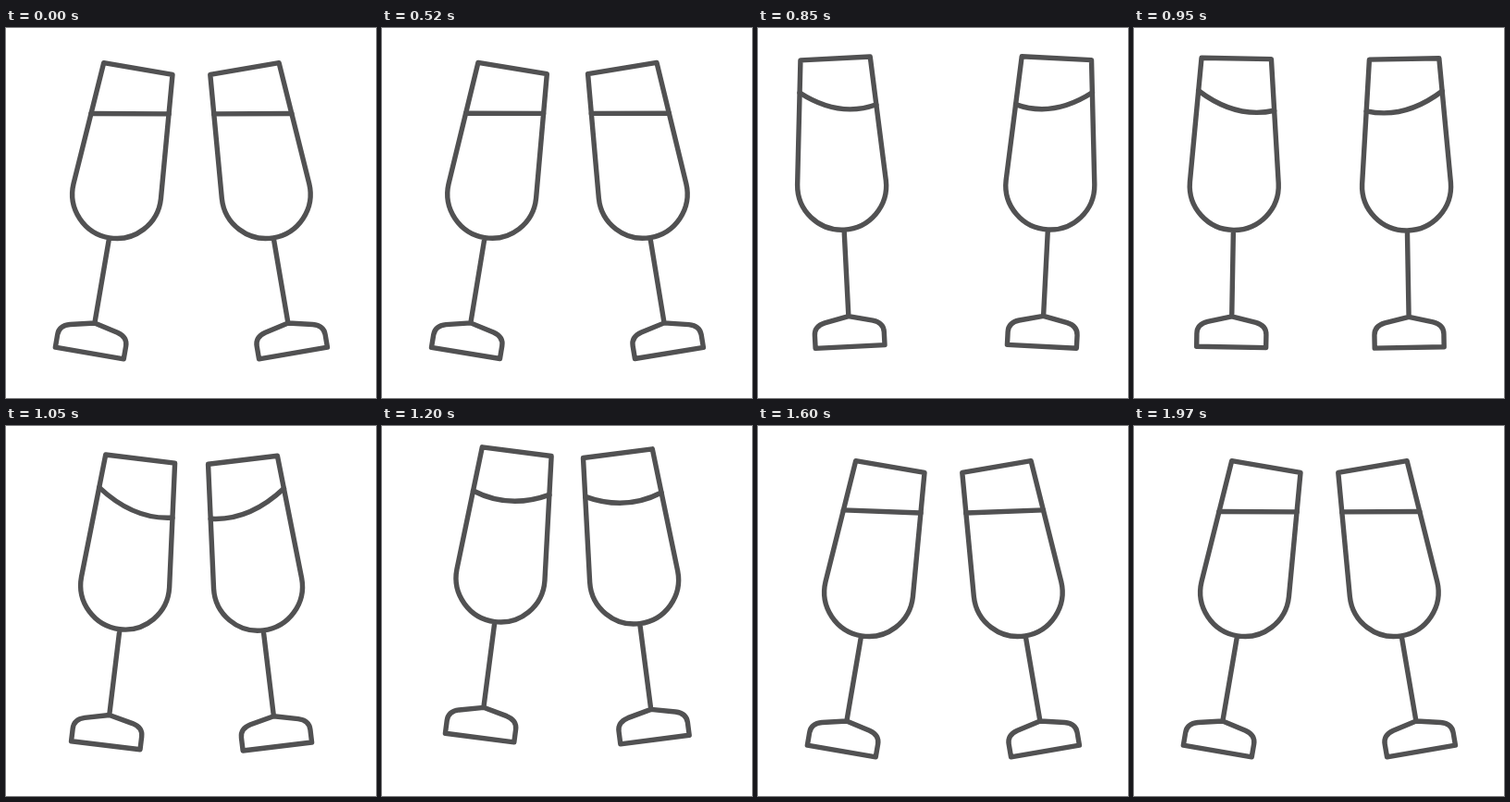
Recreate the animation shown at these times as an HTML page. Size 400x400 px, loop 2020 ms.

```html
<!DOCTYPE html>
<html lang="en">
<head>
<meta charset="utf-8">
<title>Toast</title>
<style>
  html, body { margin: 0; width: 100%; height: 100%; overflow: hidden; background: #fff; }
  svg { display: block; width: 100%; height: 100%; }
  path { fill: none; stroke: #515152; stroke-width: 5.4; stroke-linecap: round; stroke-linejoin: round; }
</style>
</head>
<body>
<svg viewBox="0 0 400 400">
  <defs>
    <path id="glass" d="M-37.7 0H37.7L47.9 134.4A48 48 0 1 1 -47.9 134.4Z M0 186V279
      M-37.5 312H37.5V298Q37.5 288 26 285L0 279L-26 285Q-37.5 288 -37.5 298Z"/>
  </defs>
  <g><use href="#glass"/><path/></g>
  <g><use href="#glass"/><path/></g>
</svg>
<script>
const LOOP = 2020, START = 520;

const smooth = u => (1 - Math.cos(Math.PI * u)) / 2;
const speedUp = u => u ** 1.6;
const slowDown = u => 1 - (1 - u) ** 2;

// Each key is [time, value, easing from the previous key].
function track(keys, t) {
  const i = keys.findIndex(k => k[0] > t);
  if (i < 0) return keys[keys.length - 1][1];
  if (i === 0) return keys[0][1];
  const [t0, v0] = keys[i - 1], [t1, v1, ease = smooth] = keys[i];
  return v0 + (v1 - v0) * ease((t - t0) / (t1 - t0));
}

// Foot position of a glass: values when pulled back, approaching, touching and rebounding.
const footX = (rest, back, touch, rebound) => [
  [490, rest], [850, back, speedUp], [1090, touch, slowDown],
  [1370, rebound, speedUp], [1570, rest, slowDown]
];
const footY = (back, near, top, rebound) => [
  [500, 351.5], [850, back], [1050, near], [1190, top],
  [1370, rebound, speedUp], [1570, 351.5, slowDown]
];

const tilt = [[490, 9.7], [790, -4], [1090, 9.6, speedUp], [1340, 6.4, slowDown], [1570, 9.7]];

// Liquid surface inside the glass: mean depth, slope across and sag in the middle.
const depth = [[500, 49.5], [850, 43.6], [1050, 47.4], [1370, 42], [1600, 49.3], [1800, 49.5]];
const slope = [[500, -13.7], [850, 17], [1050, 23], [1360, -38], [1600, -11], [1760, -14.6], [1970, -13.7]];
const sag = [[500, 0], [850, 10.5], [1050, 9.5], [1370, 8.5], [1600, 0]];

const glasses = [
  { x: footX(90.3, 99.5, 108, 97.5), y: footY(344.5, 345.3, 337, 342.3), flip: '' },
  { x: footX(89.5, 93, 107, 98.2), y: footY(344.3, 346.5, 339, 345.3), flip: 'translate(400) scale(-1 1) ' }
];
const groups = document.querySelectorAll('svg > g');

const halfWidth = y => 37.7 + y * 10.2 / 134.4;

function surface(t) {
  const mid = track(depth, t), half = track(slope, t) / 2;
  const left = mid - half, right = mid + half;
  const xl = -halfWidth(left), xr = halfWidth(right);
  return `M${xl} ${left}Q${(xl + xr) / 2} ${mid + 2 * track(sag, t)} ${xr} ${right}`;
}

function draw(now) {
  let t = now % LOOP;
  if (t < START) t = 0;
  const liquid = surface(t), angle = track(tilt, t);
  glasses.forEach((g, i) => {
    groups[i].setAttribute('transform',
      `${g.flip}translate(${track(g.x, t)} ${track(g.y, t)}) rotate(${angle}) translate(0 -312)`);
    groups[i].lastElementChild.setAttribute('d', liquid);
  });
}

const begin = performance.now();
function tick() {
  draw(performance.now() - begin);
  requestAnimationFrame(tick);
}
tick();
</script>
</body>
</html>
```
